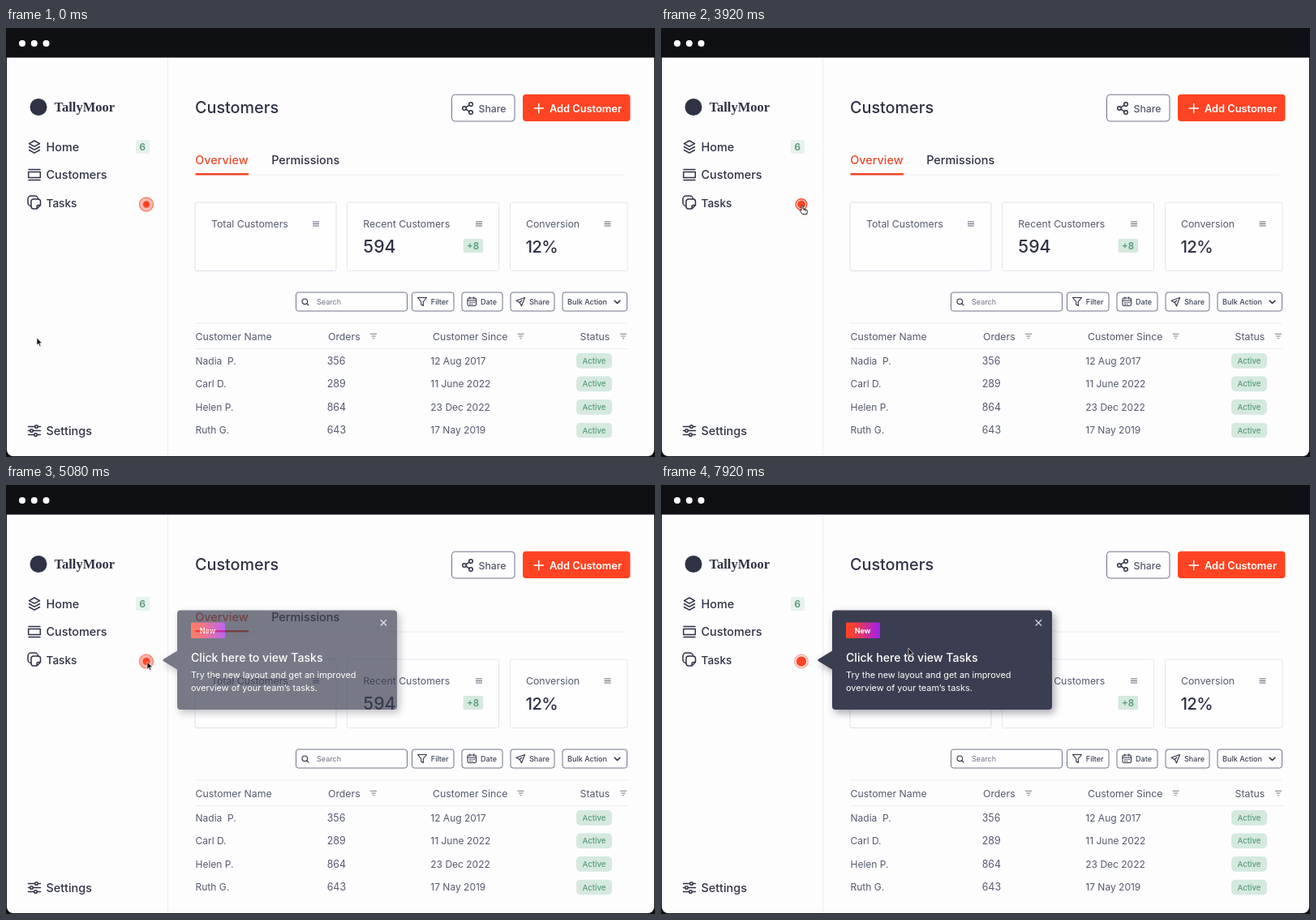
An HTML page that plays this animation: 800 px wide and 529 px high, repeating every 8 s.

```html
<!DOCTYPE html>
<html lang="en">
<head>
<meta charset="utf-8">
<title>Customer dashboard</title>
<style>
html, body { margin: 0; width: 100%; height: 100%; overflow: hidden; background: #0f1014; }
svg { display: block; width: 100%; height: 100%; }
text { font: 400 12.3px Inter, "Open Sans", sans-serif; fill: #555a6d; white-space: pre; }
.line { fill: none; stroke: #2f3244; stroke-width: 1.5; stroke-linejoin: round; stroke-linecap: round; }
.thin { stroke-width: 1.1; }
.box { fill: #fefeff; stroke: #6f7488; stroke-width: 1; }
.card { fill: #fefeff; stroke: #e6e7ed; }
.rule { stroke: #ebecf1; fill: none; }
.brand { font: 700 16.5px "Liberation Serif", "Noto Serif", serif; fill: #2f3244; }
.nav text, .tabs text { font-size: 14.4px; font-weight: 500; fill: #2f3244; }
.tabs .on { fill: #ee4a2c; }
.title { font-size: 19.8px; font-weight: 500; fill: #2f3244; }
.number { font-size: 21.3px; font-weight: 500; fill: #2f3244; }
.tool text { font-size: 9.05px; font-weight: 500; fill: #3f4357; }
.tool .hint { font-weight: 400; fill: #6d7184; }
.good { font-weight: 600; fill: #579b78; }
.mint { fill: #d5e9df; }
#rows text { font-size: 12px; }
#rows .count { font-size: 12.4px; }
#rows .good { font-size: 9.6px; font-weight: 500; }
#tip { filter: drop-shadow(3px 4px 5px rgba(20, 22, 40, .38)); }
#tip text { fill: #fff; font-size: 10.9px; }
#tip .head { font-size: 14.1px; font-weight: 500; }
#tip .new { font-size: 9px; font-weight: 700; }
</style>
</head>
<body>
<svg viewBox="0 0 800 529" preserveAspectRatio="none">
  <defs>
    <linearGradient id="fade"><stop stop-color="#ff4424"/><stop offset=".25" stop-color="#f63c3c"/><stop offset="1" stop-color="#a01ff2"/></linearGradient>
    <path id="menu" d="M-4-2.5H4M-4 0H4M-4 2.5H4" stroke="#5c6073" stroke-width="1.1"/>
    <path id="sort" d="M-4-2.7H4M-2.6 0H2.6M-1.1 2.7H1.1" stroke="#777b8c" stroke-width="1.1"/>
    <g id="nodes" class="line"><circle cx="-4" r="2.3"/><circle cx="4" cy="-5" r="2.3"/><circle cx="4" cy="5" r="2.3"/><path d="M-2-1.2 2-3.8M-2 1.2 2 3.8"/></g>
  </defs>
  <rect width="800" height="529" fill="#0f1014"/>
  <path d="M1 36.5H799V520a8 8 0 0 1-8 8H9a8 8 0 0 1-8-8z" fill="#fdfdfe"/>
  <g fill="#fff"><circle cx="20" cy="19" r="4"/><circle cx="34.8" cy="19" r="4"/><circle cx="49.5" cy="19" r="4"/></g>
  <path class="rule" d="M199.5 37V528"/>

  <circle cx="40" cy="97.5" r="10.5" fill="#2f3244"/>
  <text class="brand" x="59.5" y="103">TallyMoor</text>
  <g class="nav">
    <path class="line" d="M35 139l6.5 3.6L35 146.2l-6.5-3.6zM28.500 146.500 35 150.100l6.500-3.600M28.500 150.500 35 154.100l6.500-3.600"/>
    <path class="line" d="M28 174.500H42M28 187.500H42M27.700 177.500H42.300V184.500H27.700z"/>
    <path class="line" d="M31 219.500a4 4 0 0 1-4-4v-4.500a4 4 0 0 1 4-4h4.500a4 4 0 0 1 4 4"/>
    <path class="line" d="M34 211h5.500a3 3 0 0 1 3 3v4.500l-4.500 4.500h-4a3 3 0 0 1-3-3v-6a3 3 0 0 1 3-3zM42.500 218.500h-2.500a2 2 0 0 0-2 2v2.500"/>
    <path class="line" d="M27.500 491.500H35.500M39.500 491.500H42.500M27.500 496.500H29.500M33.500 496.500H42.500M27.500 501.500H34.500M38.500 501.500H42.500"/>
    <g class="line"><circle cx="37.500" cy="491.500" r="1.800"/><circle cx="31.500" cy="496.500" r="1.800"/><circle cx="36.500" cy="501.500" r="1.800"/></g>
    <text x="49.500" y="152">Home</text>
    <text x="49.500" y="186.200">Customers</text>
    <text x="49.500" y="220.600" style="font-size:13.600px">Tasks</text>
    <text x="49.500" y="501.700">Settings</text>
  </g>
  <rect x="160" y="138" width="17" height="17" rx="2" fill="#e7f2ee"/>
  <text class="good" x="164.200" y="151">6</text>

  <text class="title" x="233" y="104.800">Customers</text>
  <rect class="box" x="549.500" y="82.200" width="77.500" height="32.800" rx="4"/>
  <use href="#nodes" x="569" y="99"/>
  <text x="582.500" y="103.600" style="font-weight:500">Share</text>
  <rect x="637" y="81.700" width="132.500" height="33.300" rx="4" fill="#ff4423"/>
  <path d="M650.500 99H663M656.700 92.700V105.200" stroke="#fff" stroke-width="1.500"/>
  <text x="670" y="103.600" style="font-size:12.800px;font-weight:600;fill:#fff">Add Customer</text>

  <g class="tabs">
    <text class="on" x="233.300" y="168.300">Overview</text>
    <text x="327.200" y="168.300">Permissions</text>
    <path class="rule" d="M299 181H762"/>
    <path d="M233.500 180.200H299" stroke="#f04627" stroke-width="2.500"/>
  </g>

  <rect class="card" x="233" y="215" width="174" height="84.500" rx="2" style="stroke:#dfe1e9"/>
  <rect class="card" x="420.500" y="215" width="187" height="84.500" rx="2"/>
  <rect class="card" x="621.500" y="215" width="144.500" height="84.500" rx="2"/>
  <text x="253" y="245.700">Total Customers</text>
  <text x="440.300" y="245.700">Recent Customers</text>
  <text x="641" y="245.700">Conversion</text>
  <use href="#menu" x="382" y="241.500"/><use href="#menu" x="583" y="241.500"/><use href="#menu" x="741.500" y="241.500"/>
  <text class="number" x="440.300" y="276.500">594</text>
  <text class="number" x="640.500" y="276.500" style="font-size:20.500px;letter-spacing:-.7px">12%</text>
  <rect class="mint" x="563.500" y="260" width="24.500" height="17" rx="2"/>
  <text class="good" x="568" y="272.800" style="font-size:11.500px">+8</text>

  <g class="tool">
    <rect class="box" x="357.500" y="326" width="137" height="23" rx="3"/>
    <rect class="box" x="500.500" y="326" width="51.500" height="23" rx="3"/>
    <rect class="box" x="562" y="326" width="50" height="23" rx="3"/>
    <rect class="box" x="622" y="326" width="54" height="23" rx="3"/>
    <rect class="box" x="686" y="326" width="79.500" height="23" rx="3"/>
    <g class="line thin">
      <circle cx="368.300" cy="337.300" r="3.300"/><path d="M370.800 339.800 373 342"/>
      <path d="M507.500 332.500H518.500L514.300 337.500V342.500L511.700 341V337.500z"/>
      <rect x="569" y="333" width="10.500" height="9.500" rx="1.800"/>
      <path d="M569 336H579.500M571.800 331.800V334M576.700 331.800V334"/>
      <path d="M571.500 338.300H577.500M571.500 340.500H575.500" stroke-dasharray="1 1.500"/>
      <path d="M639.500 332.500 629 336.300 633.200 338.500 635.500 342.800zM633.200 338.500 635.800 336"/>
      <path d="M750.200 336.200 753.500 339.500 756.800 336.200" stroke-width="1.600"/>
    </g>
    <text class="hint" x="383" y="340.800">Search</text>
    <text x="523.800" y="340.800">Filter</text>
    <text x="585" y="340.800">Date</text>
    <text x="645" y="340.800">Share</text>
    <text x="692" y="340.800">Bulk Action</text>
  </g>

  <path class="rule" d="M233 364H766M233 395.500H766"/>
  <text x="233.500" y="384.700">Customer Name</text>
  <text x="397" y="384.700">Orders</text>
  <text x="526" y="384.700">Customer Since</text>
  <text x="707.500" y="384.700">Status</text>
  <use href="#sort" x="453" y="380"/><use href="#sort" x="634.500" y="380"/><use href="#sort" x="761" y="380"/>
  <g id="rows"></g>

  <g id="tip" opacity="0">
    <path d="M215 154.500H478a4 4 0 0 1 4 4V273a4 4 0 0 1-4 4H215a4 4 0 0 1-4-4V227.500L194.500 217.500q-2.500-1.500 0-3L211 204.500V158.500a4 4 0 0 1 4-4z" fill="#3b3e50"/>
    <rect x="228" y="169.500" width="42" height="19.500" rx="1.500" fill="url(#fade)"/>
    <text class="new" x="238.700" y="182.700">New</text>
    <path d="M461.700 166.200 469 173.500M469 166.200 461.700 173.500" stroke="#c9cbd4" stroke-width="1.500"/>
    <text class="head" x="228" y="217.500">Click here to view Tasks</text>
    <text x="228" y="237.500">Try the new layout and get an improved</text>
    <text x="228" y="253.500">overview of your team’s tasks.</text>
  </g>

  <g transform="translate(173 217.500)" fill="#ff4423" stroke="#ff4423">
    <circle id="ring" stroke-width="1.400"/>
    <circle id="core" stroke="none"/>
  </g>

  <g id="cursor" stroke-linejoin="round">
    <path id="arrow" d="M0 0V9.200L2.100 7.300 3.600 10.700 5.100 10 3.600 6.700H6.400z" fill="#08080c" stroke="#fff" stroke-width=".7"/>
    <path id="hand" d="M-1 1.500q1-1.800 2 0V5l4.200 1q1.300.4 1.200 1.700L5.800 11.500H.3L-2.800 7.300q.2-1.300 1.800-.3zM2.700 5.500v2M4.500 6v1.700" fill="#fff" stroke="#111" stroke-width=".9"/>
  </g>
</svg>
<script>
const LOOP = 8000;
const el = id => document.getElementById(id);
const set = (node, attrs) => Object.entries(attrs).forEach(([k, v]) => node.setAttribute(k, v));
const clamp = v => Math.max(0, Math.min(1, v));
const mix = (a, b, p) => a + (b - a) * p;
const ease = p => p * p * (3 - 2 * p);
const span = (t, from, to) => clamp((t - from) / (to - from));

const customers = [
  ['Nadia  P.', '356', '12 Aug 2017'],
  ['Carl D.', '289', '11 June 2022'],
  ['Helen P.', '864', '23 Dec 2022'],
  ['Ruth G.', '643', '17 Nay 2019']
];
el('rows').innerHTML = customers.map(([name, orders, since], i) => `
  <g transform="translate(0 ${i * 28.55})">
    <text x="233.5" y="414.7">${name}</text>
    <text class="count" x="395.7" y="414.7">${orders}</text>
    <text x="523.3" y="414.7">${since}</text>
    <rect class="mint" x="703" y="401" width="44" height="18.7" rx="5"/>
    <text class="good" x="710.6" y="413.9">Active</text>
  </g>`).join('');

// Two beats, then a rest. Columns: time, core radius, ring radius, stroke alpha, fill alpha
const CYCLE = 2170, BEAT = 835;
const beat = [
  [0, 6.2, 8.2, .5, 0],
  [80, 6.8, 7, 1, 0],
  [250, 5, 6.8, 1, 0],
  [420, 4.7, 7, 1, 0],
  [500, 4.7, 8.7, .5, .45],
  [670, 4.2, 8.5, .6, .35],
  [BEAT, 6.2, 8.2, .5, 0]
];

function pulse(t) {
  const phase = (t - 1500 + CYCLE) % CYCLE;
  const time = phase < 2 * BEAT ? phase % BEAT : 0;
  const i = beat.findIndex(key => key[0] > time);
  const a = beat[i - 1], b = beat[i];
  const [, core, ring, stroke, fill] = a.map((v, k) => mix(v, b[k], (time - a[0]) / (b[0] - a[0])));
  set(el('core'), { r: core });
  set(el('ring'), { r: ring, 'stroke-opacity': stroke, 'fill-opacity': fill });
}

function pointer(t) {
  const go = ease(span(t, 1430, 2170));
  const leave = ease(span(t, 7500, 8400));
  const curve = (a, b, c) => mix(mix(a, b, go), mix(b, c, go), go);
  const x = mix(curve(38, 148, 174), 465, leave);
  const y = mix(curve(382, 328, 218), 181, leave);
  const hand = t >= 2170 && t < 4830;
  set(el('cursor'), { transform: `translate(${x} ${y})` });
  set(el('hand'), { visibility: hand ? 'visible' : 'hidden' });
  set(el('arrow'), { visibility: hand ? 'hidden' : 'visible' });
}

function draw(now) {
  const t = now % LOOP;
  pulse(t);
  pointer(t);
  set(el('tip'), { opacity: span(t, 4750, 5230) });
}

let start;
function tick(now) {
  start ??= now;
  draw(now - start);
  requestAnimationFrame(tick);
}
draw(0);
requestAnimationFrame(tick);
</script>
</body>
</html>
```
